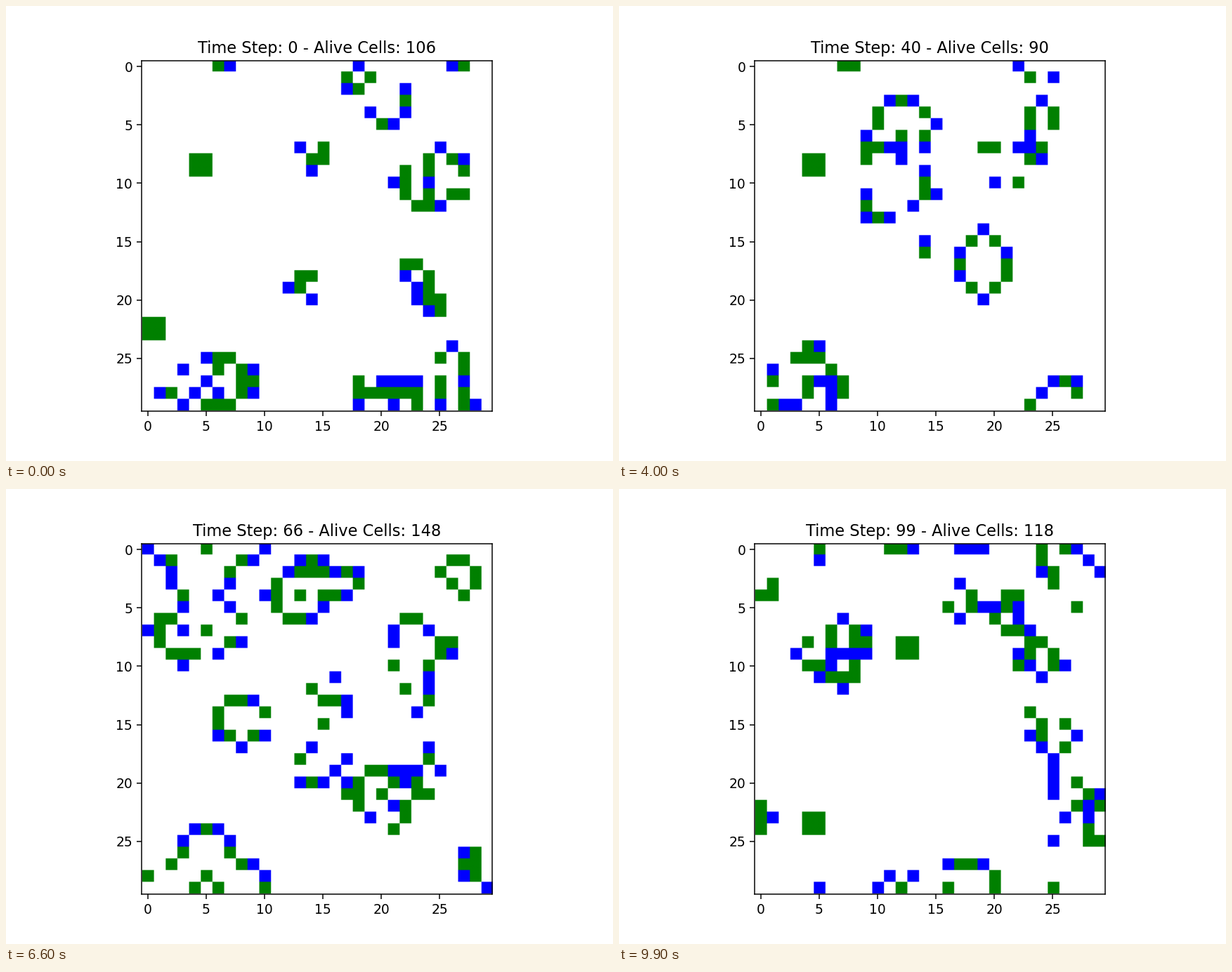
A matplotlib script for the animation above (10000 ms loop, 864 by 648 pixels).

```python
from itertools import pairwise

import numpy as np
import matplotlib.pyplot as plt
from matplotlib.animation import FuncAnimation
from matplotlib.colors import to_rgb

SIZE = 30
STEPS = 100
DEAD, SURVIVED, BORN = 0, 1, 2
COLORS = np.array([to_rgb(c) for c in ("white", "green", "blue")])
SOFT = 12      # samples per cell, gives the edges a slight blur
SHIFT = 0.03   # half a pixel, in cells

seed = np.full((SIZE, SIZE), DEAD)


def stroke(*points):
    """Line of surviving cells through the points, with newborn tips."""
    for (x0, y0), (x1, y1) in pairwise(points):
        n = max(abs(x1 - x0), abs(y1 - y0)) + 1
        xs = np.linspace(x0, x1, n).round().astype(int)
        ys = np.linspace(y0, y1, n).round().astype(int)
        seed[ys, xs] = SURVIVED
    for x, y in (points[0], points[-1]):
        seed[y, x] = BORN


def spur(*points):
    """Stroke out and back, so only its first cell is newborn."""
    stroke(*points, *points[::-1])


def block(x, y):
    seed[y:y + 2, x:x + 2] = SURVIVED


def plant():
    block(4, 8)
    block(0, 22)

    # Gliders
    stroke((13, 7), (14, 8), (15, 7), (15, 8), (14, 9))
    stroke((12, 19), (13, 18), (14, 18), (13, 19), (14, 20))

    # Top edge
    spur((7, 0), (6, 0))
    spur((26, 0), (27, 0))
    stroke((18, 0), (19, 1), (17, 1), (18, 2), (17, 1), (17, 2))
    seed[1, 18] = DEAD
    stroke((22, 2), (22, 4))
    stroke((21, 5), (20, 5), (19, 4))

    # Right side
    stroke((27, 8), (27, 9), (25, 7))
    stroke((25, 7), (24, 8), (24, 10))
    stroke((21, 10), (22, 9), (22, 11), (23, 12), (24, 11), (24, 12), (25, 12))
    spur((25, 12), (26, 11), (27, 11))
    stroke((22, 18), (22, 17), (23, 17), (24, 18), (24, 19), (23, 20))
    stroke((23, 19), (25, 21), (25, 20), (24, 21))

    # Bottom right
    spur((26, 24), (25, 25))
    stroke((26, 24), (27, 25), (27, 27))
    stroke((27, 27), (27, 29), (28, 29))
    spur((25, 29), (25, 27))
    stroke((18, 29), (18, 27), (19, 28), (23, 28), (23, 29), (22, 28), (21, 29))
    stroke((20, 27), (21, 27))
    stroke((22, 27), (23, 27))

    # Bottom left
    stroke((3, 26))
    stroke((1, 28), (2, 28), (3, 29))
    stroke((5, 25), (7, 25), (5, 27))
    stroke((9, 26), (8, 26), (8, 28), (9, 27), (9, 28))
    stroke((4, 28), (5, 29), (7, 29), (6, 28))


def evolve(grid):
    """One Game of Life generation on a torus."""
    alive = grid != DEAD
    near = sum(np.roll(alive, (dy, dx), (0, 1)).astype(int)
               for dy in (-1, 0, 1) for dx in (-1, 0, 1) if dy or dx)
    stays = alive & ((near == 2) | (near == 3))
    born = ~alive & (near == 3)
    return np.where(born, BORN, np.where(stays, SURVIVED, DEAD))


def paint(grid):
    return COLORS[grid].repeat(SOFT, axis=0).repeat(SOFT, axis=1)


plant()
history = [seed]
while len(history) < STEPS:
    history.append(evolve(history[-1]))

fig, ax = plt.subplots(figsize=(6.4, 4.8), dpi=135)
low, high = -0.5, SIZE - 0.5
image = ax.imshow(paint(seed), interpolation="bilinear",
                  extent=(low + SHIFT, high + SHIFT, high - SHIFT, low - SHIFT))
ax.set(xlim=(low, high), ylim=(high, low))
title = ax.set_title("")


def update(step):
    grid = history[step]
    image.set_data(paint(grid))
    title.set_text(f"Time Step: {step} - Alive Cells: {np.count_nonzero(grid)}")
    return image, title


anim = FuncAnimation(fig, update, frames=STEPS, interval=100,
                     repeat=True, repeat_delay=0, blit=False)
plt.show()
```
